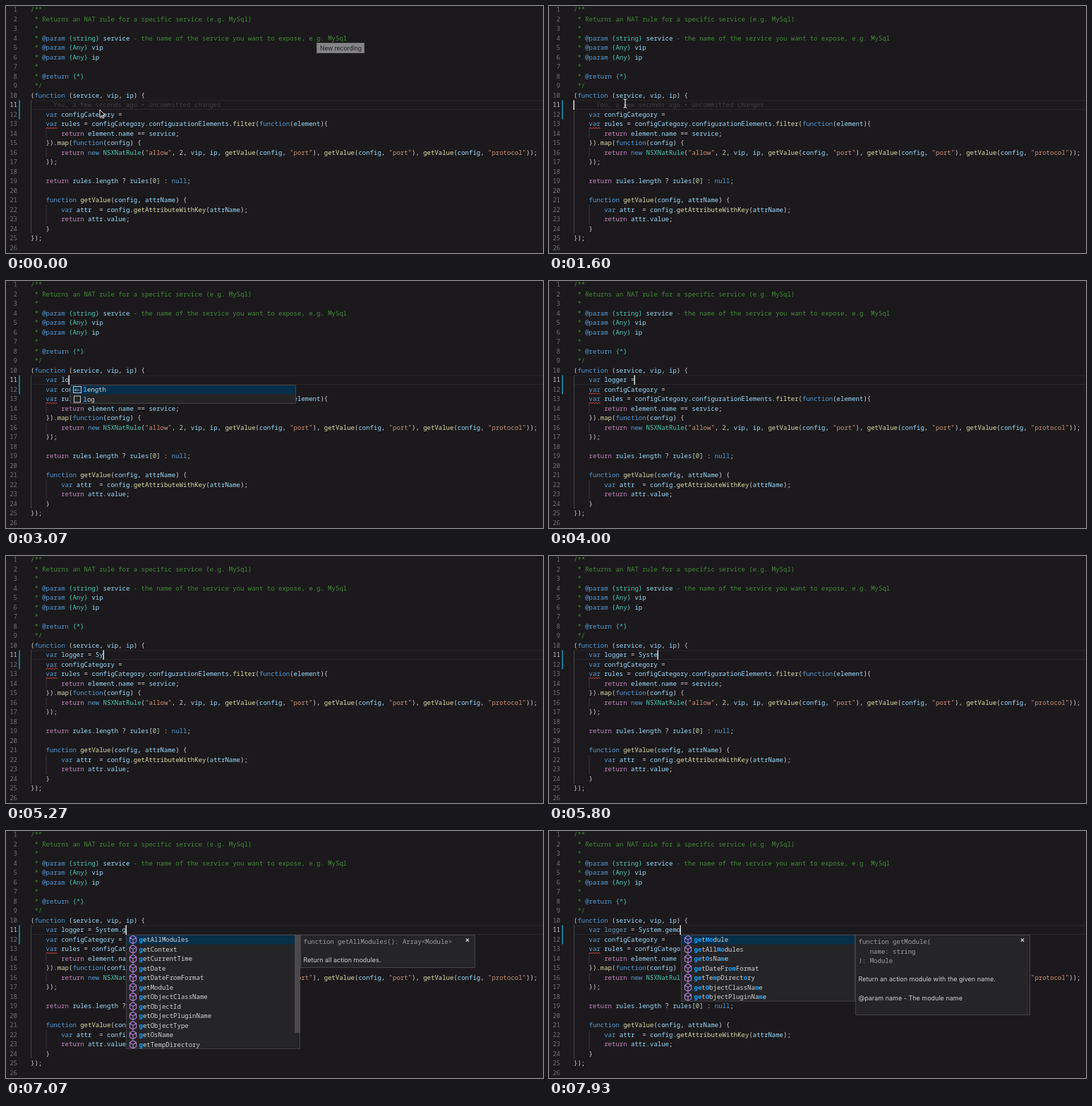
An HTML page with a canvas for the animation above (8 s loop, 761x350 px).

```html
<!DOCTYPE html>
<html lang="en">
<head>
<meta charset="utf-8">
<title>Code completion</title>
<style>
  html, body { margin: 0; width: 100%; height: 100%; overflow: hidden; background: #1b191c; }
  canvas { display: block; }
</style>
</head>
<body>
<canvas id="stage" width="761" height="350"></canvas>
<script>
const ctx = document.getElementById('stage').getContext('2d');
const LOOP = 8000, LEFT = 35, CHAR = 5.4, ROW = 13.5, TYPED_ROW = 10;
const MONO = '9px "Noto Sans Mono", "DejaVu Sans Mono", monospace';
const SANS = '9px Inter, "Open Sans", sans-serif';
const color = {
  back: '#1b191c', panel: '#252427', border: '#434145', selected: '#062f4a', match: '#18a3ff',
  comment: '#45893a', keyword: '#569cd6', control: '#c586c0', type: '#4ec9b0', call: '#dcdcaa',
  string: '#ce9178', number: '#b5cea8', name: '#9cdcfe', plain: '#d4d4d4', error: '#e5453f'
};

const source = `/**
 * Returns an NAT rule for a specific service (e.g. MySql)
 *
 * @param {string} service - the name of the service you want to expose, e.g. MySql
 * @param {Any} vip
 * @param {Any} ip
 *
 * @return {*}
 */
(function (service, vip, ip) {

    var configCategory =
    var rules = configCategory.configurationElements.filter(function(element){
        return element.name == service;
    }).map(function(config) {
        return new NSXNatRule("allow", 2, vip, ip, getValue(config, "port"), getValue(config, "port"), getValue(config, "protocol"));
    });

    return rules.length ? rules[0] : null;

    function getValue(config, attrName) {
        var attr  = config.getAttributeWithKey(attrName);
        return attr.value;
    }
});
`.split('\n');

const codeRules = [
  [/"[^"]*"/y, 'string'], [/return\b/y, 'control'], [/(function|var|new|null)\b/y, 'keyword'],
  [/NSXNatRule/y, 'type'], [/\d+/y, 'number'], [/\w+(?=\()/y, 'call'], [/\w+/y, 'name'], [/[^\w"]+/y, 'plain']
];
const docRules = [
  [/@\w+/y, 'keyword'], [/\{.*?\}/y, 'type'], [/(?<=\} )\w+/y, 'name'], [/[^@{ ]+|./y, 'comment']
];

// Typing bursts: text, start time, time between keys
const bursts = [
  ['var ', 2270, 110], ['lo', 2830, 140], ['gger', 3150, 130], [' = ', 3700, 200], ['Sy', 5000, 170],
  ['stem', 5400, 140], ['.', 6800, 0], ['g', 7000, 0], ['emo', 7270, 220]
];
const keys = [{ text: '    ', time: 2070 }];
for (const [text, start, step] of bursts)
  [...text].forEach((ch, i) => keys.push({ text: ch, time: start + i * step }));

const allMembers = ['getAllModules', 'getContext', 'getCurrentTime', 'getDate', 'getDateFromFormat', 'getModule',
  'getObjectClassName', 'getObjectId', 'getObjectPluginName', 'getObjectType', 'getOsName', 'getTempDirectory'];
const closeMembers = ['getModule', 'getAllModules', 'getOsName', 'getDateFromFormat', 'getTempDirectory',
  'getObjectClassName', 'getObjectPluginName'];

const rowTop = row => row * ROW - 1.5;
const colX = col => LEFT + col * CHAR;

function rect(x, y, w, h, fill) {
  ctx.fillStyle = fill;
  ctx.fillRect(x, y, w, h);
}

function frame(x, y, w, h, stroke) {
  ctx.strokeStyle = stroke;
  ctx.lineWidth = 1;
  ctx.strokeRect(x + .5, y + .5, w - 1, h - 1);
}

function write(text, x, y, fill, font = MONO) {
  ctx.font = font;
  ctx.fillStyle = fill;
  ctx.fillText(text, x, y);
}

function drawCode(line, row, unused) {
  const rules = /^( \*|\/\*)/.test(line) ? docRules : codeRules;
  for (let at = 0; at < line.length;) {
    for (const [pattern, kind] of rules) {
      pattern.lastIndex = at;
      const token = pattern.exec(line)?.[0];
      if (!token) continue;
      write(token, colX(at), rowTop(row) + 9.8, token === unused ? '#6f96ab' : color[kind]);
      at += token.length;
      break;
    }
  }
}

function drawSquiggle(row) {
  const y = rowTop(row) + 12.5;
  ctx.beginPath();
  for (let i = 0; i <= 8; i++) ctx.lineTo(colX(4) + i * 2, y + (i % 2 ? -1 : 1));
  ctx.strokeStyle = color.error;
  ctx.lineWidth = 1;
  ctx.stroke();
}

function drawEditor(t, typed) {
  rect(0, 0, 761, 350, color.back);
  const top = rowTop(TYPED_ROW);
  rect(LEFT, top, 726, 1, '#29272a');
  rect(LEFT, top + ROW - 1, 726, 1, '#29272a');
  rect(LEFT, top, 1, 14 * ROW, '#454347');
  for (const [row, count] of [[13, 1], [15, 1], [21, 2]])
    rect(56.5, rowTop(row), 1, count * ROW, '#39373b');
  rect(18, top, 2, 2 * ROW, '#167898');

  source.forEach((line, row) => {
    ctx.textAlign = 'right';
    write(row + 1, 16, rowTop(row) + 9.8, row === TYPED_ROW ? '#c6c6c6' : '#727076');
    ctx.textAlign = 'left';
    if (row !== TYPED_ROW) drawCode(line, row);
  });
  const unused = (t > 6000 && t < 6870) || t > 7850;
  drawCode(typed, TYPED_ROW, unused && 'logger');
  if (!typed) write('You, a few seconds ago • Uncommitted changes', 67, top + 9.8, '#3f3d41');
  drawSquiggle(12);
  if (t > 3900 && t < 5550) drawSquiggle(11);
}

// Letters of the query found in order, or null
function findLetters(label, query) {
  const found = new Set();
  let at = -1;
  for (const ch of query) {
    at = label.toLowerCase().indexOf(ch, at + 1);
    if (at < 0) return null;
    found.add(at);
  }
  return found;
}

function drawCube(x, y) {
  const corner = i => [x + 5.3 * Math.sin(i * Math.PI / 3), y - 5.8 * Math.cos(i * Math.PI / 3)];
  ctx.beginPath();
  for (let i = 0; i < 6; i++) ctx.lineTo(...corner(i));
  ctx.closePath();
  for (const i of [1, 3, 5]) {
    ctx.moveTo(x, y);
    ctx.lineTo(...corner(i));
  }
  ctx.strokeStyle = '#b180d7';
  ctx.lineWidth = 1.1;
  ctx.stroke();
}

function drawWordIcon(x, y, label) {
  if (label === 'log') return frame(x - 5, y - 5, 10, 10, '#c5c5c5');
  frame(x - 6, y - 5, 12, 10, '#c5c5c5');
  write('abc', x - 4.5, y + 2, '#c5c5c5', '5px Inter, sans-serif');
}

function drawList(x, width, labels, query, drawIcon) {
  const top = rowTop(TYPED_ROW + 1), height = labels.length * ROW;
  rect(x, top, width, height, color.panel);
  rect(x, top, width, ROW, color.selected);
  labels.forEach((label, i) => {
    const y = top + i * ROW;
    const swapped = query === 'gemo' && findLetters(label, 'geom');
    const found = swapped || findLetters(label, query) || new Set();
    drawIcon(x + 10, y + 7, label);
    [...label].forEach((ch, k) => write(ch, x + 18.5 + k * CHAR, y + 10,
      found.has(k) ? color.match : color.plain, found.has(k) ? 'bold ' + MONO : MONO));
  });
  frame(x, top, width, height, color.border);
}

function drawDocs(x, height, signature, notes) {
  const top = rowTop(TYPED_ROW + 1);
  rect(x, top, 248, height, color.panel);
  frame(x, top, 248, height, color.border);
  signature.forEach((line, i) => write(line, x + 4.5, top + 13 + i * ROW, '#a09ea2'));
  notes.forEach((line, i) =>
    write(line, x + 4.5, top + 39 + (signature.length - 1) * ROW + i * 27, '#d0d0d0', SANS));
  write('×', x + 233.5, top + 10.5, '#d0d0d0', 'bold 10px Inter, sans-serif');
}

function drawSuggestions(typed) {
  const x = Math.round(colX(typed.length));
  const word = typed.match(/var (lo?g?)$/)?.[1];
  if (word) drawList(x + 2, 320, word === 'log' ? ['log'] : ['length', 'log'], word[0], drawWordIcon);

  const member = typed.match(/System\.(\w+)$/)?.[1];
  if (!member) return;
  const left = x + (member.length > 2 ? 1 : 0);
  if (member.length > 2) {
    drawList(left, 247, closeMembers, member, drawCube);
    drawDocs(left + 247, 114, ['function getModule(', '   name: string', '): Module'],
      ['Return an action module with the given name.', '@param name - The module name']);
  } else {
    drawList(left, 247, allMembers, member, drawCube);
    rect(left + 239, rowTop(TYPED_ROW + 1), 8, 139, '#4b494d');
    drawDocs(left + 247, 47, ['function getAllModules(): Array<Module>'], ['Return all action modules.']);
  }
}

function drawPointer(t) {
  const p = Math.min(1, Math.max(0, (t - 400) / 600));
  const ease = p * p * (3 - 2 * p);
  ctx.save();
  ctx.translate(133 - 25 * ease, 147 - 9 * ease);
  if (t < 600) {
    const arrow = new Path2D('M0 0V10.5L2.5 8.2L4.3 12L6 11.2L4.3 7.6H7.6Z');
    ctx.fillStyle = '#111';
    ctx.strokeStyle = '#eee';
    ctx.lineWidth = 1;
    ctx.fill(arrow);
    ctx.stroke(arrow);
  } else {
    ctx.strokeStyle = '#e4e4e4';
    ctx.lineWidth = 1.2;
    ctx.stroke(new Path2D('M-2.5 -6Q0 -6 0 -4.5Q0 -6 2.5 -6M0 -4.5V4.5M-2.5 6Q0 6 0 4.5Q0 6 2.5 6M-1.5 2.5H1.5'));
  }
  ctx.restore();
}

function drawTooltip() {
  rect(440, 52, 68, 15, '#858486');
  frame(440, 52, 68, 15, '#6a696b');
  write('New recording', 445, 62.5, '#1d1c1e', '8.5px Inter, "Open Sans", sans-serif');
}

function draw(t) {
  const pressed = keys.filter(key => key.time <= t);
  const typed = pressed.map(key => key.text).join('');
  const lastPress = pressed.length ? pressed[pressed.length - 1].time : -500;

  drawEditor(t, typed);
  drawSuggestions(typed);
  if (Math.floor((t - lastPress) / 500) % 2 === 0)
    rect(Math.round(colX(typed.length)) - .5, rowTop(TYPED_ROW), 1.5, ROW, '#e0e0e0');
  if (!typed) drawPointer(t);
  if (t < 400) drawTooltip();
}

function tick() {
  draw(performance.now() % LOOP);
  requestAnimationFrame(tick);
}
tick();
</script>
</body>
</html>
```
